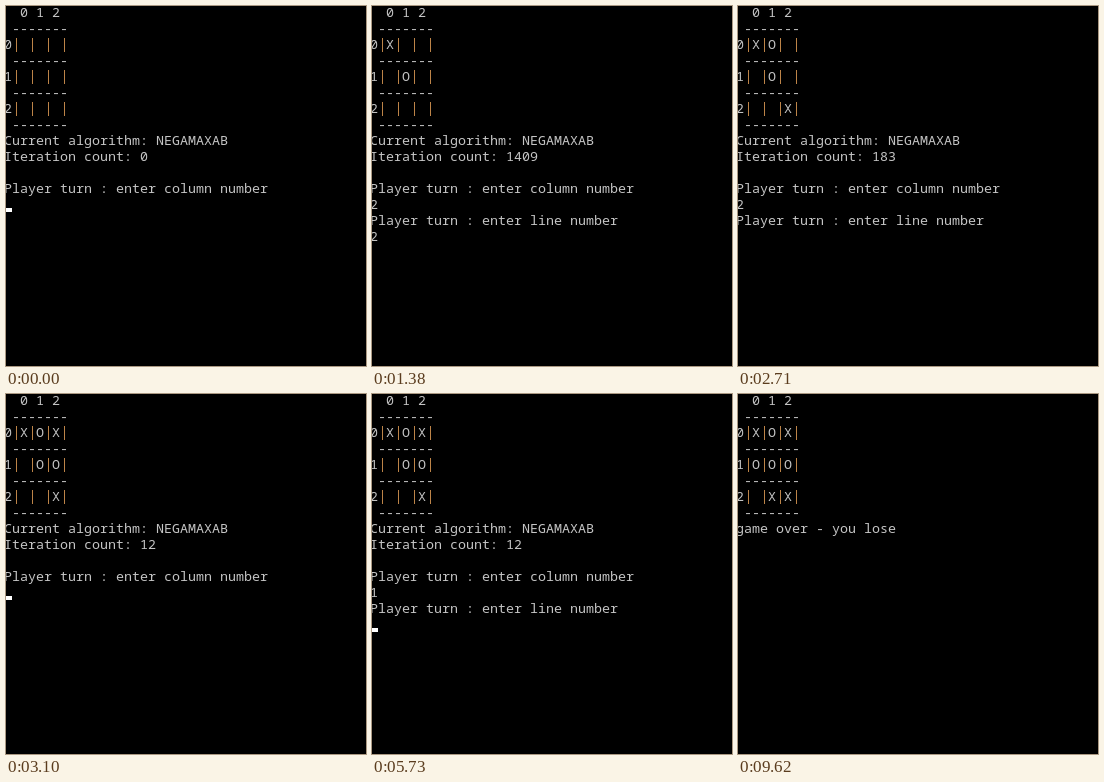
An HTML page with a canvas for the animation above (9790 ms loop, 360x360 px).

```html
<!DOCTYPE html>
<html lang="en">
<head>
<meta charset="utf-8">
<title>Console tic-tac-toe</title>
<style>
  html, body { margin: 0; width: 100%; height: 100%; overflow: hidden; background: #000; }
  canvas { display: block; width: 360px; height: 360px; }
</style>
</head>
<body>
<canvas id="stage" width="360" height="360"></canvas>
<script>
const LOOP = 9790;
const CELL_W = 8, CELL_H = 16, LEFT = -2;
const ctx = document.getElementById('stage').getContext('2d', { alpha: false });

const RULE = ' -------';
const board = rows => ['  0 1 2', RULE].concat(
  ...rows.map((row, i) => [`${i}|${[...row].join('|')}|`, RULE]));

const turn = (rows, count) => [
  ...board(rows),
  'Current algorithm: NEGAMAXAB',
  `Iteration count: ${count}`,
  '',
  'Player turn : enter column number'
];
const withColumn = (lines, column) => [...lines, column, 'Player turn : enter line number'];

const first = turn(['   ', '   ', '   '], 0);
const second = turn(['X  ', ' O ', '   '], 1409);
const third = turn(['XO ', ' O ', '  X'], 183);
const fourth = turn(['XOX', ' OO', '  X'], 12);
const lost = [...board(['XOX', 'OOO', ' XX']), 'game over - you lose'];

const secondLine = withColumn(second, '2');
const fourthLine = withColumn(fourth, '1');

// [start in ms, screen lines, cursor as [column, row] when lit]
const steps = [
  [0, first, [0, 12]],
  [230, withColumn(first, '0'), [0, 14]],
  [460, [], [1, 14]],
  [540, second, [0, 12]],
  [1150, [...second, '2'], [1, 12]],
  [1230, secondLine],
  [1380, [...secondLine, '2']],
  [1460, []],
  [1540, third, [0, 12]],
  [2240, third],
  [2710, withColumn(third, '2')],
  [3020, []],
  [3100, fourth, [0, 12]],
  [3800, fourth],
  [4320, fourth, [0, 12]],
  [4870, fourth],
  [5350, fourth, [0, 12]],
  [5730, fourthLine, [0, 14]],
  [6430, fourthLine],
  [6980, fourthLine, [0, 14]],
  [7450, [], [1, 14]],
  [7530, lost, [0, 9]],
  [8540, lost],
  [9090, lost, [0, 9]],
  [9620, lost]
];

function drawLine(line, row) {
  ctx.fillStyle = '#c4c4c4';
  ctx.fillText(line.replaceAll('|', ' '), LEFT, row * CELL_H + 11);
  ctx.fillStyle = '#bd8448';
  [...line].forEach((char, col) => {
    if (char === '|') ctx.fillRect(LEFT + col * CELL_W + 4, row * CELL_H, 1, 14);
  });
}

function draw([, lines, cursor]) {
  ctx.fillStyle = '#000';
  ctx.fillRect(0, 0, 360, 360);
  ctx.font = '13.3333px "Noto Sans Mono", "DejaVu Sans Mono", monospace';
  lines.forEach(drawLine);
  if (cursor) {
    const [col, row] = cursor;
    ctx.fillStyle = '#fff';
    ctx.fillRect(LEFT + col * CELL_W, row * CELL_H + 10, CELL_W, 4);
  }
}

const startTime = performance.now();

function frame() {
  const time = (performance.now() - startTime) % LOOP;
  draw(steps.findLast(([start]) => start <= time));
  requestAnimationFrame(frame);
}
frame();
</script>
</body>
</html>
```
